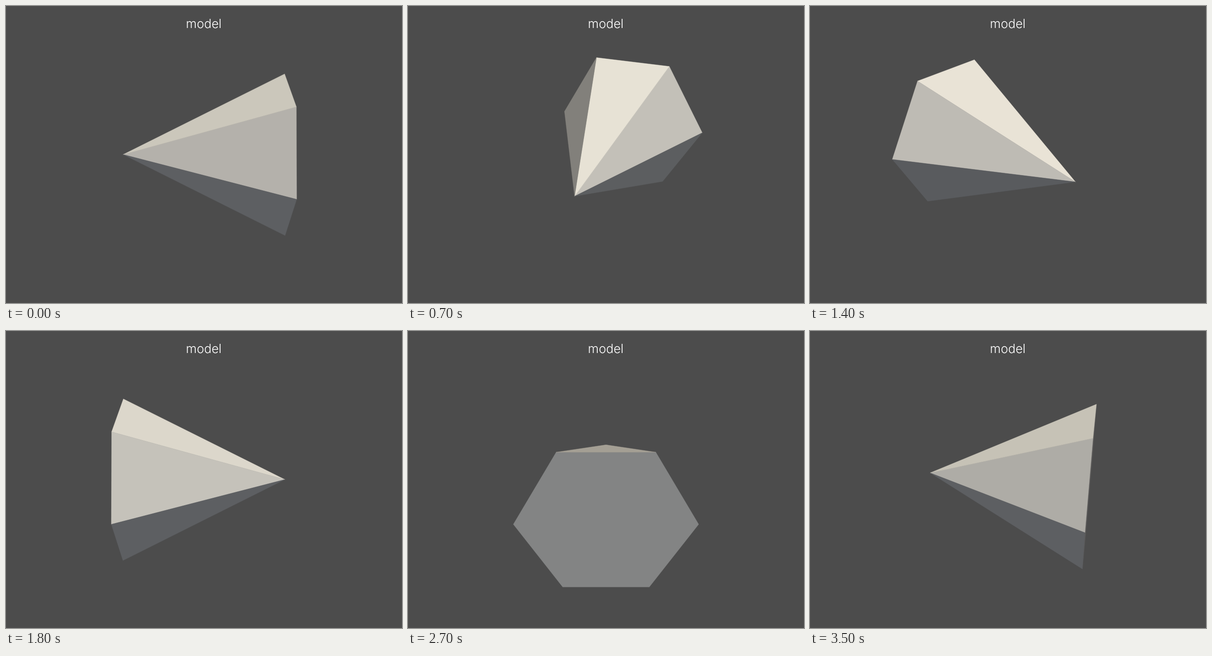
Animation of 864 by 648 pixels, one loop 3600 ms. Source, as an HTML page with a canvas:

```html
<!DOCTYPE html>
<html lang="en">
<head>
<meta charset="utf-8">
<title>model</title>
<style>
html, body { margin: 0; width: 100%; height: 100%; overflow: hidden; background: #4c4c4c; }
canvas { display: block; }
</style>
</head>
<body>
<canvas id="stage" width="864" height="648"></canvas>
<script>
const ctx = document.getElementById('stage').getContext('2d');
const W = 864, H = 648, STEPS = 36, STEP_MS = 100;

// Camera circles the cone at radius 3, raised by the length of its bounding box.
const LIFT = Math.sqrt(2.75);
const DIST = Math.hypot(3, LIFT);
const SIN = LIFT / DIST, COS = 3 / DIST;
const FOCAL = H / 2 / Math.tan(Math.PI / 12);

const rad = deg => deg * Math.PI / 180;
const dot = (a, b) => a[0] * b[0] + a[1] * b[1] + a[2] * b[2];

// Directional lights fixed to the camera: elevation, azimuth, intensity, colour.
function light(elev, azim, power, color) {
  const e = rad(elev), a = rad(azim);
  return {
    dir: [Math.cos(e) * Math.sin(a), Math.sin(e), Math.cos(e) * Math.cos(a)],
    color: color.map(c => c * power)
  };
}
const WHITE = [1, 0.9999, 0.9998];
const LIGHTS = [
  light(50, 10, 0.75, [1, 0.9723, 0.9021]),
  light(-75, 0, 0.25, [0.9087, 0.9484, 1]),
  light(0, 0, 0.25, WHITE),
  light(0, 110, 0.75 / 3.5, WHITE),
  light(0, -110, 0.75 / 3.5, WHITE)
];

function shade(normal) {
  const rgb = [0, 0, 0];
  for (const l of LIGHTS) {
    const k = Math.max(0, dot(normal, l.dir));
    l.color.forEach((c, i) => rgb[i] += k * c);
  }
  return `rgb(${rgb.map(v => Math.min(255, Math.round(v * 255))).join(',')})`;
}

// Cone coordinates (along axis, across, up) to camera coordinates.
function toCamera([axis, across, up], turn) {
  const s = Math.sin(turn), c = Math.cos(turn);
  const right = -axis * c + across * s;
  const front = axis * s + across * c;
  return [right, up * COS - front * SIN, front * COS + up * SIN];
}

function project([x, y, z]) {
  const k = FOCAL / (DIST - z);
  return [W / 2 + x * k, H / 2 - y * k];
}

// Hexagonal cone: height 1, radius 0.5.
const ring = k => [-0.5, 0.5 * Math.cos(rad(60 * k)), 0.5 * Math.sin(rad(60 * k))];
const APEX = [0.5, 0, 0];
const APOTHEM = 0.5 * Math.cos(rad(30));
const SLANT = Math.hypot(1, APOTHEM);
const FACES = [{ points: [0, 1, 2, 3, 4, 5].map(ring), normal: [-1, 0, 0] }];
for (let k = 0; k < 6; k++) {
  const mid = rad(60 * k + 30);
  FACES.push({
    points: [APEX, ring(k), ring(k + 1)],
    normal: [APOTHEM, Math.cos(mid), Math.sin(mid)].map(v => v / SLANT)
  });
}

function drawFace(face, turn) {
  const normal = toCamera(face.normal, turn);
  const points = face.points.map(p => toCamera(p, turn));
  const [x, y, z] = points[0];
  if (dot(normal, [-x, -y, DIST - z]) <= 0) return;
  ctx.beginPath();
  points.map(project).forEach(p => ctx.lineTo(...p));
  ctx.closePath();
  ctx.fillStyle = ctx.strokeStyle = shade(normal);
  ctx.fill();
  ctx.stroke(); // hides the seams between faces
}

function draw(time) {
  const step = Math.floor(time / STEP_MS) % STEPS;
  const turn = step / STEPS * 2 * Math.PI;
  ctx.fillStyle = '#4c4c4c';
  ctx.fillRect(0, 0, W, H);
  ctx.lineWidth = 0.5;
  ctx.lineJoin = 'round';
  FACES.forEach(face => drawFace(face, turn));
  ctx.fillStyle = '#fff';
  ctx.font = '300 27px Inter, Lato, sans-serif';
  ctx.textAlign = 'center';
  ctx.fillText('model', 431.5, 47.5);
}

function tick() {
  draw(performance.now());
  requestAnimationFrame(tick);
}
tick();
</script>
</body>
</html>
```
